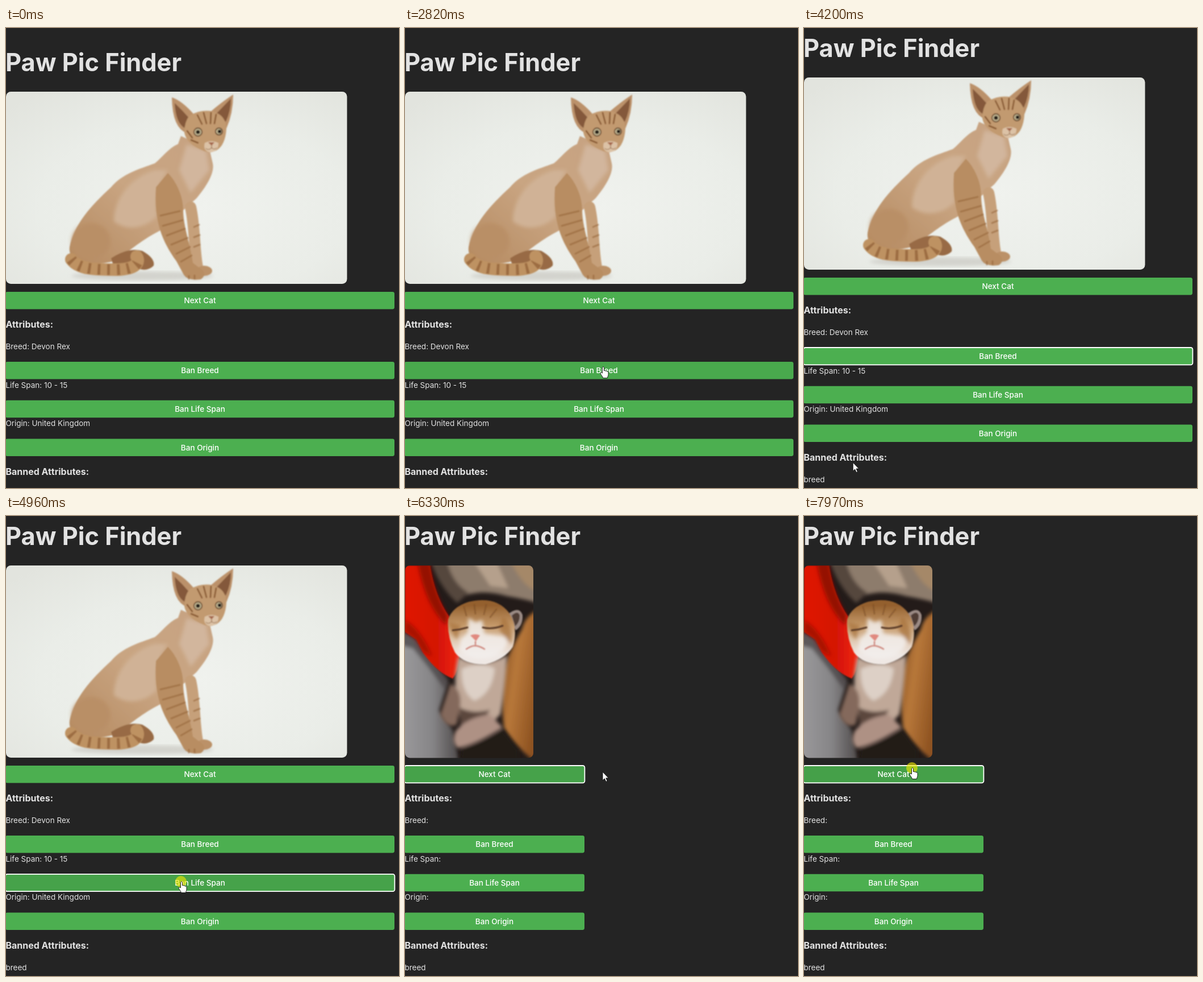
Recreate the animation shown at these times as an HTML page. Size 692 by 809 pixels, loop 8 s.

```html
<!DOCTYPE html>
<html lang="en">
<head>
<meta charset="utf-8">
<style>
  html, body { margin: 0; width: 100%; height: 100%; overflow: hidden; background: #242424; }
  svg { display: block; }
  text { font: 430 13.53px Inter, sans-serif; fill: #e2e2e2; font-optical-sizing: none; }
  .h1 { font-weight: 700; font-size: 43.3px; }
  .h3 { font-weight: 700; font-size: 16px; }
  .button text { font-weight: 500; fill: #fff; text-anchor: middle; }
  .line { fill: none; stroke-linecap: round; }
</style>
</head>
<body>
<svg width="692" height="809" viewBox="0 0 692 809">
  <defs>
    <radialGradient id="studio" cx=".55" cy=".6" r=".75">
      <stop offset="0" stop-color="#f0f2ee"/><stop offset=".6" stop-color="#eaede8"/><stop offset="1" stop-color="#e2e4de"/>
    </radialGradient>
    <linearGradient id="coat" x1="0" y1="1" x2="1" y2="0">
      <stop offset="0" stop-color="#b58a60"/><stop offset=".5" stop-color="#c9a582"/><stop offset="1" stop-color="#c7a382"/>
    </linearGradient>
    <linearGradient id="face" x1="0" y1="0" x2="0" y2="1">
      <stop offset=".08" stop-color="#94602f"/><stop offset=".38" stop-color="#c39767"/><stop offset=".62" stop-color="#e0c8b0"/><stop offset=".85" stop-color="#efe8e4"/>
    </linearGradient>
    <linearGradient id="cloth">
      <stop offset="0" stop-color="#e01505"/><stop offset=".6" stop-color="#d41206"/><stop offset="1" stop-color="#f02a14"/>
    </linearGradient>
    <linearGradient id="blanket" x1="0" y1="0" x2="1" y2="0">
      <stop offset="0" stop-color="#9c9b9d"/><stop offset=".55" stop-color="#868587"/><stop offset="1" stop-color="#4f4b4b"/>
    </linearGradient>
    <linearGradient id="flank" x1="0" y1="0" x2="1" y2=".6">
      <stop offset="0" stop-color="#7d4a1f"/><stop offset=".45" stop-color="#b8783a"/><stop offset="1" stop-color="#8c5120"/>
    </linearGradient>
    <filter id="soft"><feGaussianBlur stdDeviation=".8"/></filter>
    <filter id="softer"><feGaussianBlur stdDeviation="3"/></filter>
    <clipPath id="wide"><rect y="112" width="600.5" height="338" rx="8.5"/></clipPath>
    <clipPath id="tall"><rect width="226" height="338.5" rx="8.5"/></clipPath>
  </defs>

  <g id="page">
    <text class="h1" x="-1" y="75.7">Paw Pic Finder</text>

    <g id="sitting" clip-path="url(#wide)">
      <rect y="112" width="601" height="339" fill="url(#studio)"/>
      <ellipse cx="240" cy="436" rx="125" ry="8" fill="#d3d3cd" filter="url(#softer)"/>
      <g filter="url(#soft)">
        <path fill="url(#coat)" d="M303 204C285 212 275 228 262 238 235 248 205 256 185 280 150 312 120 345 112 385 108 415 150 420 190 410 215 395 235 375 268 358 285 350 300 330 335 300 352 280 368 255 364 238L358 212 308 190Z"/>
        <g filter="url(#softer)">
          <path fill="#d0b296" d="M262 250C220 262 190 300 190 340 215 360 250 350 266 330 262 300 270 270 285 250Z"/>
          <ellipse cx="150" cy="375" rx="34" ry="32" fill="#b98f66"/>
          <path fill="#d2b69d" d="M318 205L352 215 358 250 325 290 305 250Z"/>
        </g>
        <path fill="#986b45" d="M185 405Q215 385 240 392 263 405 260 418 250 428 235 424L190 420Z"/>
        <g class="line">
          <path stroke="#be9262" stroke-width="22" d="M115 407C128 425 160 425 195 425 230 424 236 412 230 402"/>
          <path stroke="#9d6d42" stroke-width="19" stroke-dasharray="5 12" style="stroke-linecap:butt" d="M115 407C128 425 160 425 195 425 230 424 236 412 230 402"/>
          <path stroke="#c6a07a" stroke-width="20" d="M325 315C333 350 331 390 337 420"/>
        </g>
        <ellipse cx="349" cy="427" rx="14" ry="9" fill="#bb9167"/>
        <path fill="#b88d62" d="M264 280C260 340 275 375 300 410L313 434Q320 445 343 442 353 435 346 426L329 413C325 380 312 350 312 320 312 296 300 270 285 255Z"/>
        <path class="line" stroke="#966639" stroke-width="3" opacity=".6" d="M272 330L306 322M276 348L311 338M283 365L315 353M291 381L320 369M300 397L324 385M308 411L327 400M322 436V441M332 435V441M331 350L340 346M331 368L341 364M331 385L341 381"/>
        <path fill="#bb916a" d="M292 122Q310 128 330 151L319 185Q293 177 292 122ZM400 117Q380 130 358 149L388 177Q400 150 400 117Z"/>
        <path fill="#84593a" d="M297 132Q311 145 322 158L315 176Q299 168 297 132ZM396 124L370 151 387 165Q396 146 396 124Z"/>
        <path fill="#c29a70" d="M323 154Q345 142 365 147 388 154 388 178 386 206 371 215 358 222 343 214 318 203 314 184 314 165 323 154Z"/>
        <path fill="#dcc2a6" d="M350 202Q362 196 374 202 375 216 360 219 346 216 350 202Z"/>
        <path class="line" stroke="#86572f" stroke-width="2.5" d="M337 153L345 169M348 149L353 168M361 149L360 168M370 152L367 168M319 181L328 193M326 197L338 202"/>
        <g fill="#c9bd98" stroke="#5e4027" stroke-width="1.8"><circle cx="338" cy="183" r="7"/><circle cx="375" cy="182" r="6"/></g>
        <g fill="#241d18"><circle cx="338" cy="183" r="3.6"/><circle cx="376" cy="182" r="3.3"/></g>
        <path fill="#a5674b" d="M356 201H367L362 207Z"/>
        <path class="line" stroke="#8c6141" d="M362 207V211Q356 216 352 212M362 211Q367 215 371 211"/>
      </g>
    </g>

    <g id="sleeping" transform="translate(0 112)" clip-path="url(#tall)">
      <rect width="226" height="339" fill="#231b19"/>
      <g filter="url(#softer)">
        <path fill="#8d7c6c" d="M72-9H235V66Q205 58 180 54 140 42 108 52 85 35 72-9Z"/>
        <path fill="#55463c" d="M44-9H74Q82 30 112 48L92 66Q62 40 44-9Z"/>
        <path fill="#b5a08c" d="M120-9H160L182 40 150 36Z"/>
        <path fill="#bd9365" d="M185-9H235V45Q210 42 185-9Z" opacity=".5"/>
        <path fill="url(#flank)" d="M235 78Q212 88 206 112 184 150 172 185 168 235 174 285 195 320 235 350Z"/>
        <path fill="url(#blanket)" d="M-9 112L20 128 50 165 76 205 60 255 84 290 95 345H-9Z"/>
        <path fill="#4a4546" d="M-9 112L18 126 50 168 76 200 70 218 40 178 14 146-9 140Z" opacity=".75"/>
      </g>
      <g filter="url(#soft)">
        <path fill="url(#cloth)" d="M0 0H44Q53 55 78 90L83 130 96 156Q96 185 84 199 56 188 32 154L20 130 0 117Z"/>
      </g>
      <g filter="url(#softer)">
        <path fill="#7e0d07" d="M22-6H44Q50 45 76 88L72 105Q36 70 22-6Z" opacity=".75"/>
        <path fill="#930f07" d="M0 96Q28 112 48 160L30 150 18 130 0 117Z" opacity=".7"/>
        <path fill="#c0a898" d="M94 160Q130 183 180 158 176 220 168 262 143 290 100 292L94 245Q83 205 94 160Z"/>
        <path fill="#ddd0c6" d="M100 182Q130 168 158 181 154 225 122 238 98 222 100 182Z"/>
        <path fill="#84695c" d="M80 208Q101 218 97 249L91 280Q73 288 62 262Z"/>
        <path fill="#5b463c" d="M96 250Q120 262 150 254L140 268 98 288Z"/>
        <path fill="#ae9184" d="M150 262Q112 266 90 290 80 309 93 321 123 316 172 285Z"/>
        <path fill="#241b19" d="M100 322Q140 310 172 288L200 325V345H96Z"/>
      </g>
      <g filter="url(#soft)">
        <path fill="#9b8b85" d="M181 86Q201 70 207 87 208 106 195 114Z"/>
        <path fill="#4f3c36" d="M188 88Q199 78 202 88 202 100 194 107Z"/>
        <path fill="url(#face)" d="M76 95Q83 73 112 64 160 53 183 83 200 108 190 143 176 165 142 174 104 175 88 153 74 126 76 95Z"/>
      </g>
      <g filter="url(#softer)">
        <path fill="#f3efed" d="M112 92L124 100 136 96 140 120 180 126Q184 148 154 161 120 170 95 150L98 130 110 118Z" opacity=".85"/>
        <path fill="#a8733d" d="M172 88Q192 108 187 138 176 128 166 112ZM78 98Q88 104 98 104L92 130Q80 120 78 98Z" opacity=".75"/>
      </g>
      <g filter="url(#soft)">
        <path class="line" stroke="#5a3a26" stroke-width="3" d="M84 114Q97 113 110 109M137 109Q153 113 172 106"/>
        <path class="line" stroke="#7b4b24" stroke-width="2.5" opacity=".6" d="M104 73L108 88M122 69L124 85M143 69L139 86M161 77L150 91"/>
        <path fill="#e0897f" d="M115 123Q124 119 132 123L125 133Z"/>
        <path class="line" stroke="#cf8a80" stroke-width="2.5" d="M124 134V139M108 147Q117 141 124 141 132 142 140 147"/>
      </g>
    </g>

    <text class="h3" x="-.6" y="527.3">Attributes:</text>
    <text class="h3" x="-.6" y="786">Banned Attributes:</text>
    <text id="banned" x="-.6" y="823.7">breed</text>
  </g>
  <circle id="press" r="10" fill="#f0e600" opacity=".62"/>
  <g id="cursor" fill="#fff" stroke="#111" stroke-width=".9" stroke-linejoin="round">
    <path id="arrow" d="M0 0V15L3.4 11.8 5.9 17.3 8.2 16.3 5.8 10.9H10.4Z"/>
    <path id="hand" transform="translate(1 0)" d="M-1.5 11V1.5C-1.5-.5 1.5-.5 1.5 1.5V7C1.8 6 4 6 4.2 7.6 4.8 6.6 6.6 7 6.8 8.4 7.6 7.6 9 8.2 9 9.6V13.5C9 16 7.6 17 7.4 19.5H-.4C-.8 17-4 14-5 11.2-4.6 9.4-2.8 9.6-1.5 11Z"/>
  </g>
</svg>
<script>
const LOOP = 8000, FADE = 300, BUTTON_HEIGHT = 30.4;
const SCROLL_AT = 3160, CLEAR_AT = 6260, SWAP_AT = 6330;
const byId = id => document.getElementById(id);
const page = byId('page');
const show = (node, visible) => node.setAttribute('visibility', visible ? 'visible' : 'hidden');

function add(parent, tag, attrs, content = '') {
  const node = document.createElementNS('http://www.w3.org/2000/svg', tag);
  for (const key in attrs) node.setAttribute(key, attrs[key]);
  node.textContent = content;
  return parent.appendChild(node);
}

const buttons = [['Next Cat', 464], ['Ban Breed', 587], ['Ban Life Span', 654.8], ['Ban Origin', 722.5]]
  .map(([label, top]) => {
    const group = add(page, 'g', { class: 'button' });
    return {
      top,
      box: add(group, 'rect', { x: -1, y: top, height: BUTTON_HEIGHT, rx: 3.4 }),
      ring: add(group, 'rect', { x: -1, y: top, height: BUTTON_HEIGHT, rx: 3.4, fill: 'none', stroke: '#fff', 'stroke-width': 1.8 }),
      label: add(group, 'text', { y: top + 20.1 }, label)
    };
  });

const details = [['Breed:', 'Devon Rex'], ['Life Span:', '10 - 15'], ['Origin:', 'United Kingdom']]
  .map(([name, value], i) => ({ name, value, node: add(page, 'text', { x: -.6, y: 565 + i * 67.7 }) }));

// Pointer path: time, x, y
const path = [
  [400, 330, 830], [1230, 440, 276], [1300, 440, 276], [1710, 471, 428], [2050, 350, 477], [2120, 350, 477],
  [2820, 348, 596], [3200, 348, 596], [3860, 40, 779], [3990, 40, 779], [4400, 171, 722], [4620, 305, 600],
  [4750, 308, 643], [5360, 308, 643], [5990, 348, 450], [6730, 348, 450], [7100, 221, 503], [7490, 190, 443], [LOOP, 190, 443]
];
const presses = [[3090, 3160], [4820, 5100], [5920, 6060], [7760, LOOP]];
// Focus changes: time, button index
const focusChanges = [[3090, 1], [4820, 2], [5920, 0]];

// Zero speed beside rests, smooth speed through the other points
function speed(i, axis) {
  const a = path[i - 1], b = path[i], c = path[i + 1];
  const resting = !a || !c || [a, c].some(p => p[1] === b[1] && p[2] === b[2]);
  return resting ? 0 : (c[axis] - a[axis]) / (c[0] - a[0]);
}

function pointer(t) {
  const i = Math.max(0, path.findIndex(p => p[0] > t) - 1);
  const a = path[i], b = path[i + 1], span = b[0] - a[0];
  const u = Math.max(0, (t - a[0]) / span), e = u * u * (3 - 2 * u);
  return [1, 2].map(k => a[k] + (b[k] - a[k]) * e
    + span * u * (1 - u) * ((1 - u) * speed(i, k) - u * speed(i + 1, k)));
}

const scrollAt = t => t < SCROLL_AT ? 0 : 25;
const rightEdge = t => t < SWAP_AT ? 684 : 316;

function isOver(button, t) {
  const [x, y] = pointer(t), dy = y + scrollAt(t) - button.top;
  return x < rightEdge(t) && dy >= 0 && dy <= BUTTON_HEIGHT;
}

function hoverAmount(button, t) {
  let sum = 0;
  for (let k = 0; k < 10; k++) sum += isOver(button, t - k * FADE / 10);
  return sum / 10;
}

function draw(t) {
  const right = rightEdge(t), [x, y] = pointer(t);
  const focus = focusChanges.filter(([start]) => t >= start).pop();
  page.setAttribute('transform', `translate(0 ${-scrollAt(t)})`);
  show(byId('sitting'), t < SWAP_AT);
  show(byId('sleeping'), t >= SWAP_AT);
  show(byId('banned'), t >= SCROLL_AT);
  for (const d of details) d.node.textContent = t < CLEAR_AT ? `${d.name} ${d.value}` : d.name;

  buttons.forEach((b, i) => {
    const h = hoverAmount(b, t);
    b.box.setAttribute('width', right + 1);
    b.box.setAttribute('fill', `rgb(${76 - 7 * h},${175 - 15 * h},${80 - 7 * h})`);
    b.ring.setAttribute('width', right + 1.4);
    b.label.setAttribute('x', (right - 1) / 2);
    show(b.ring, focus && focus[1] === i);
  });

  const over = buttons.some(b => isOver(b, t)), place = `translate(${x} ${y})`;
  byId('cursor').setAttribute('transform', place);
  byId('press').setAttribute('transform', place);
  show(byId('arrow'), t >= 460 && !over);
  show(byId('hand'), t >= 460 && over);
  show(byId('press'), presses.some(([start, end]) => t >= start && t < end));
}

function tick() {
  draw(performance.now() % LOOP);
  requestAnimationFrame(tick);
}
tick();
</script>
</body>
</html>
```
